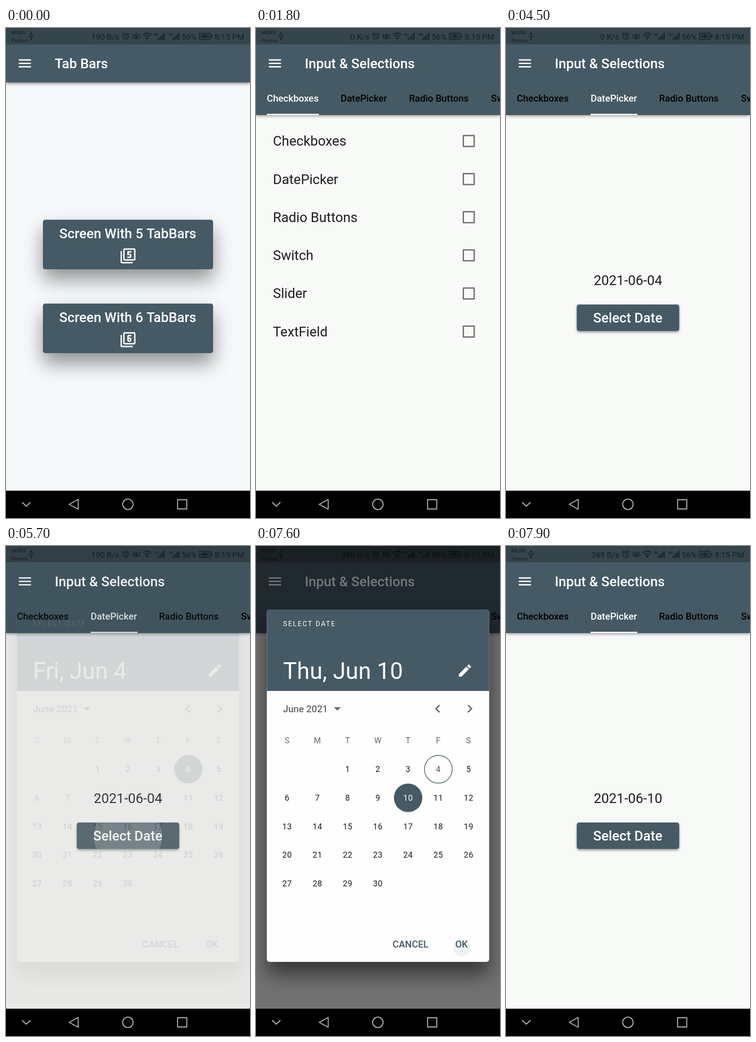
An HTML page with a canvas for the animation above (8 s loop, 529 by 1058 pixels).

```html
<!DOCTYPE html>
<html lang="en">
<head>
<meta charset="utf-8">
<title>Tab bars</title>
<style>
html, body { margin: 0; width: 529px; height: 1058px; overflow: hidden; background: #000; }
canvas { display: block; }
</style>
</head>
<body>
<canvas id="stage" width="529" height="1058"></canvas>
<script>
const W = 529, H = 1058, LOOP = 8000, NAV_TOP = 999;
const DP = W / 360;
const SLATE = '#455a64', PAPER = '#f8faf7', INK = '#1d1f1f', GREY = '#666', DIM = '#172025';

const stage = document.getElementById('stage');
const buffer = Object.assign(document.createElement('canvas'), { width: W, height: H });
const screen = stage.getContext('2d'), spare = buffer.getContext('2d');
let g = screen;

const ICONS = {
  menu: 'M3 18h18v-2H3zM3 13h18v-2H3zM3 6v2h18V6z',
  stack: 'M21 1H7c-1.1 0-2 .9-2 2v14c0 1.1.9 2 2 2h14c1.1 0 2-.9 2-2V3c0-1.1-.9-2-2-2zm0 16H7V3h14zM3 5H1v16c0 1.1.9 2 2 2h16v-2H3z',
  5: 'M17 13v-2c0-1.1-.9-2-2-2h-2V7h4V5h-6v6h4v2h-4v2h4c1.1 0 2-.9 2-2z',
  6: 'M13 15h2c1.1 0 2-.9 2-2v-2c0-1.1-.9-2-2-2h-2V7h4V5h-4c-1.1 0-2 .9-2 2v6c0 1.1.9 2 2 2zm0-4h2v2h-2z',
  edit: 'M3 17.25V21h3.75L17.81 9.94l-3.75-3.75zM20.71 7.04c.39-.39.39-1.02 0-1.41l-2.34-2.34c-.39-.39-1.02-.39-1.41 0l-1.83 1.83 3.75 3.75z',
  drop: 'M7 10l5 5 5-5z',
  left: 'M15.41 7.41L14 6l-6 6 6 6 1.41-1.41L10.83 12z',
  right: 'M10 6L8.59 7.41 13.17 12l-4.58 4.58L10 18l6-6z'
};

const clamp = v => Math.min(1, Math.max(0, v));
const phase = (t, start, length) => clamp((t - start) / length);

// CSS "ease" curve, solved by bisection
function ease(x) {
  const bez = (a, b, u) => 3 * a * u * (1 - u) ** 2 + 3 * b * u * u * (1 - u) + u ** 3;
  let lo = 0, hi = 1;
  for (let i = 0; i < 20; i++) {
    const mid = (lo + hi) / 2;
    if (bez(.25, .25, mid) < x) lo = mid; else hi = mid;
  }
  return bez(.1, 1, lo);
}

function text(str, x, y, size, color, { weight = 400, align = 'left', spacing = 0 } = {}) {
  g.font = `${weight} ${size}px Roboto, sans-serif`;
  g.textAlign = align;
  g.letterSpacing = spacing + 'px';
  g.fillStyle = color;
  g.fillText(str, x, y);
}

function box(x, y, w, h, r, color, shadow) {
  g.save();
  if (shadow) {
    g.shadowBlur = shadow[0];
    g.shadowOffsetY = shadow[1];
    g.shadowColor = `rgba(0,0,0,${shadow[2]})`;
  }
  g.fillStyle = color;
  g.beginPath();
  g.roundRect(x, y, w, h, r);
  g.fill();
  g.restore();
}

function disc(x, y, r, color, outline) {
  g.beginPath();
  g.arc(x, y, r, 0, 7);
  g.fillStyle = g.strokeStyle = color;
  if (outline) { g.lineWidth = outline; g.stroke(); } else g.fill();
}

function line(d, color, width) {
  g.strokeStyle = color;
  g.lineWidth = width;
  g.stroke(new Path2D(d));
}

function icon(name, cx, cy, color) {
  g.save();
  g.translate(cx - 12 * DP, cy - 12 * DP);
  g.scale(DP, DP);
  g.fillStyle = color;
  g.fill(new Path2D(ICONS[name]));
  g.restore();
}

function ripple(x, y, w, h, r, cx, cy, radius, color) {
  g.save();
  g.beginPath();
  g.roundRect(x, y, w, h, r);
  g.clip();
  disc(cx, cy, radius, color);
  g.restore();
}

// Paints a group as one piece with a shared opacity
function layer(alpha, dy, draw) {
  if (alpha <= 0) return;
  spare.clearRect(0, 0, W, H);
  g = spare;
  draw();
  g = screen;
  g.globalAlpha = alpha;
  g.drawImage(buffer, 0, dy);
  g.globalAlpha = 1;
}

function appBar(title, height) {
  box(0, 0, W, height, 0, SLATE, [7, 2, .45]);
  icon('menu', 41, 76.4, '#fff');
  text(title, 105.8, 87, 20 * DP, '#fff', { weight: 500 });
}

function bigButton(n, y, press) {
  box(80, y, 369, 107, 5, SLATE, [42, 22, .42]);
  if (press > 0) ripple(80, y, 369, 107, 5, 264.5, y + 54, press * 200, 'rgba(255,255,255,.21)');
  text(`Screen With ${n} TabBars`, 264, y + 39.5, 20 * DP, '#fff', { weight: 500, align: 'center' });
  icon('stack', 264.5, y + 78, '#fff');
  icon(n, 264.5, y + 78, '#fff');
}

function homePage(t) {
  box(0, 0, W, H, 0, t < 100 ? '#f5f9fa' : PAPER);
  bigButton(6, 595, phase(t, 920, 170));
  g.save();
  g.translate(0, 414);
  g.rotate(phase(t, 900, 200) ** 2 * Math.PI / 2);
  g.translate(0, -414);
  bigButton(5, 414, 0);
  g.restore();
  appBar('Tab Bars', 117.6);
}

function checkbox(cx, cy, p) {
  const s = 18 * DP, x = cx - s / 2, y = cy - s / 2, fill = clamp(p * 2), tick = clamp(p * 2 - 1);
  const inset = DP * 2 + fill * (s / 2 - DP * 2);
  box(x, y, s, s, 1.5, p > 0 ? SLATE : '#727372');
  if (fill < 1) box(x + inset, y + inset, s - 2 * inset, s - 2 * inset, 0, PAPER);
  if (!tick) return;
  const a = clamp(tick * 2), b = clamp(tick * 2 - 1);
  const at = (u, v) => `${x + u * s} ${y + v * s}`;
  let d = `M${at(.15, .45)}L${at(.15 + .25 * a, .45 + .25 * a)}`;
  if (b) d += `L${at(.4 + .45 * b, .7 - .45 * b)}`;
  line(d, '#fff', 2 * DP);
}

function checkList(t) {
  const taps = [2270, 2700, 3100];
  ['Checkboxes', 'DatePicker', 'Radio Buttons', 'Switch', 'Slider', 'TextField'].forEach((name, i) => {
    const y = 244 + i * 56 * DP;
    text(name, 36.7, y + 10.3, 20 * DP, INK);
    checkbox(461.3, y, i < taps.length ? phase(t, taps[i], 200) : 0);
  });
}

function datePage(t) {
  text(t < 7700 ? '2021-06-04' : '2021-06-10', 264.5, 554.7, 20 * DP, INK, { align: 'center' });
  box(153.5, 597, 222, 57, 5, SLATE, [5, 3, .4]);
  const press = phase(t, 5560, 220);
  if (press > 0 && t < 6000) ripple(153.5, 597, 222, 57, 5, 264.5, 626, press * 115, 'rgba(255,255,255,.2)');
  text('Select Date', 264, 636, 20 * DP, '#fff', { weight: 500, align: 'center' });
}

function inputPage(t) {
  const p = ease(phase(t, 4085, 300));
  box(0, 0, W, H, 0, PAPER);
  g.save();
  g.translate(-W * p, 0);
  if (p < 1) checkList(t);
  g.translate(W, 0);
  if (p > 0) datePage(t);
  g.restore();

  appBar('Input & Selections', 188.1);
  const glow = [1 - p, p, 0, 0];
  [['Checkboxes', 23.5], ['DatePicker', 183.5], ['Radio Buttons', 331.7], ['Switch', 509.5]].forEach(([name, x], i) => {
    const v = 255 * glow[i];
    text(name, x, 158.8, 14 * DP, `rgb(${v},${v},${v})`, { weight: 500 });
  });
  box(23.5 + 160 * p, 185.2, 112.7 - 11.3 * p, 2.9, 0, '#fff');
}

function dialog(t) {
  const picked = t < 6250 ? 4 : 10;
  box(23.5, 137, 482, 761, 6, '#fdfefd', [40, 28, .5]);
  box(23.5, 137, 482, 176, [6, 6, 0, 0], SLATE);
  text('SELECT DATE', 58.8, 173.4, 10 * DP, '#fff', { spacing: 1.5 * DP });
  text(picked === 4 ? 'Fri, Jun 4' : 'Thu, Jun 10', 58.8, 286.8, 34 * DP, '#fff', { spacing: .15 });
  icon('edit', 453, 269, '#fff');

  text('June 2021', 58.5, 358.6, 14 * DP, GREY, { weight: 500 });
  icon('drop', 176.3, 351, GREY);
  icon('left', 394, 351.2, GREY);
  icon('right', 463.6, 351.2, GREY);

  const column = i => 67.6 + i * 65.55;
  const cell = { align: 'center', spacing: .4 * DP };
  [...'SMTWTFS'].forEach((s, i) => text(s, column(i), 426.4, 12 * DP, GREY, cell));
  for (let day = 1; day <= 30; day++) {
    const slot = day + 1, x = column(slot % 7), y = 482 + Math.floor(slot / 7) * 42 * DP;
    let color = INK;
    if (day === picked) { disc(x, y, 30.8, SLATE); color = '#fff'; }
    else if (day === 4) { disc(x, y, 30.1, SLATE, 1.5); color = SLATE; }
    text(day, x, y + 6.2, 12 * DP, color, cell);
  }

  if (t >= 7560) ripple(415, 834, 63, 53, 5, 446, 868 - 8 * phase(t, 7600, 100), 18 + 30 * phase(t, 7600, 100), 'rgba(69,90,100,.08)');
  text('CANCEL', 296, 867.2, 14 * DP, SLATE, { weight: 500 });
  text('OK', 432, 867.2, 14 * DP, SLATE, { weight: 500 });
}

function statusBar(t) {
  const rate = t < 1800 ? '190 B/s' : t < 5200 ? '0 K/s' : t < 6700 ? '190 B/s' : '388 B/s';
  box(0, 0, W, 35.3, 0, 'rgba(0,0,0,.24)');
  text('MURV', 11.5, 14.3, 11.5, DIM);
  text('Pemun', 11.5, 30.5, 11.5, DIM);
  text(rate, 245.5, 24.5, 17.4, DIM, { align: 'right' });
  text('56%', 381, 24.5, 17.4, DIM);
  text('8:15 PM', 452.5, 24.5, 17.4, DIM);

  line('M54.5 11V25M50 15v4l4.5 3M59 14v4l-4.5 3M52.5 13l2-3 2 3', DIM, 1.3);
  disc(54.5, 25, 1.8, DIM);
  disc(259.5, 18.5, 6, DIM, 1.6);
  line('M259.5 14.5v4.5l3 2M252 14l4-4M267 14l-4-4', DIM, 1.6);
  line('M274 19q8.500-9 17 0q-8.500 9-17 0M275 13l2 2M282.500 10v3M290 13l-2 2', DIM, 1.5);
  disc(282.5, 19, 2.6, DIM);
  line('M297 15q9-8 18 0M300 18.500q6-5 12 0M303 22q3-2.500 6 0', DIM, 1.7);
  disc(306, 24, 1.5, DIM);
  for (const x of [320, 352]) {
    text('3G', x, 16.5, 8, DIM, { weight: 500 });
    for (let i = 0; i < 4; i++) box(x + 9.5 + i * 4, 21 - i * 3.4, 2.4, 4.5 + i * 3.4, 0, DIM);
  }
  line('M419 11.500h24v13h-24z', DIM, 1.3);
  box(421, 13.5, 20, 9, 0, 'rgba(23,32,37,.4)');
  line('M425 18h5M431 14v8M431 18h6', DIM, 2);
  box(445, 14.5, 2.2, 7, 1, DIM);
}

function navBar() {
  const color = '#c9c9c9';
  box(0, NAV_TOP, W, H - NAV_TOP, 0, '#000');
  g.lineJoin = 'round';
  line('M35 1024l9 8.500 9-8.500', color, 1.8);
  line('M137 1028.500l19.500-10.500v21z', color, 1.8);
  disc(264.3, 1028.5, 11.3, color, 1.8);
  line('M372 1018.500h20v20h-20z', color, 1.8);
  g.lineJoin = 'miter';
}

function frame() {
  const t = performance.now() % LOOP;
  const enter = phase(t, 1200, 300);
  if (enter < 1) homePage(t);
  if (enter === 1) inputPage(t);
  else layer(enter ** 1.6, H / 4 * (1 - ease(enter)), () => inputPage(t));
  statusBar(t);
  const shown = phase(t, 5680, 170) * (1 - phase(t, 7700, 150));
  if (shown) {
    box(0, 0, W, NAV_TOP, 0, `rgba(0,0,0,${.54 * shown})`);
    layer(shown, 0, () => dialog(t));
  }
  navBar();
  requestAnimationFrame(frame);
}
frame();
</script>
</body>
</html>
```
